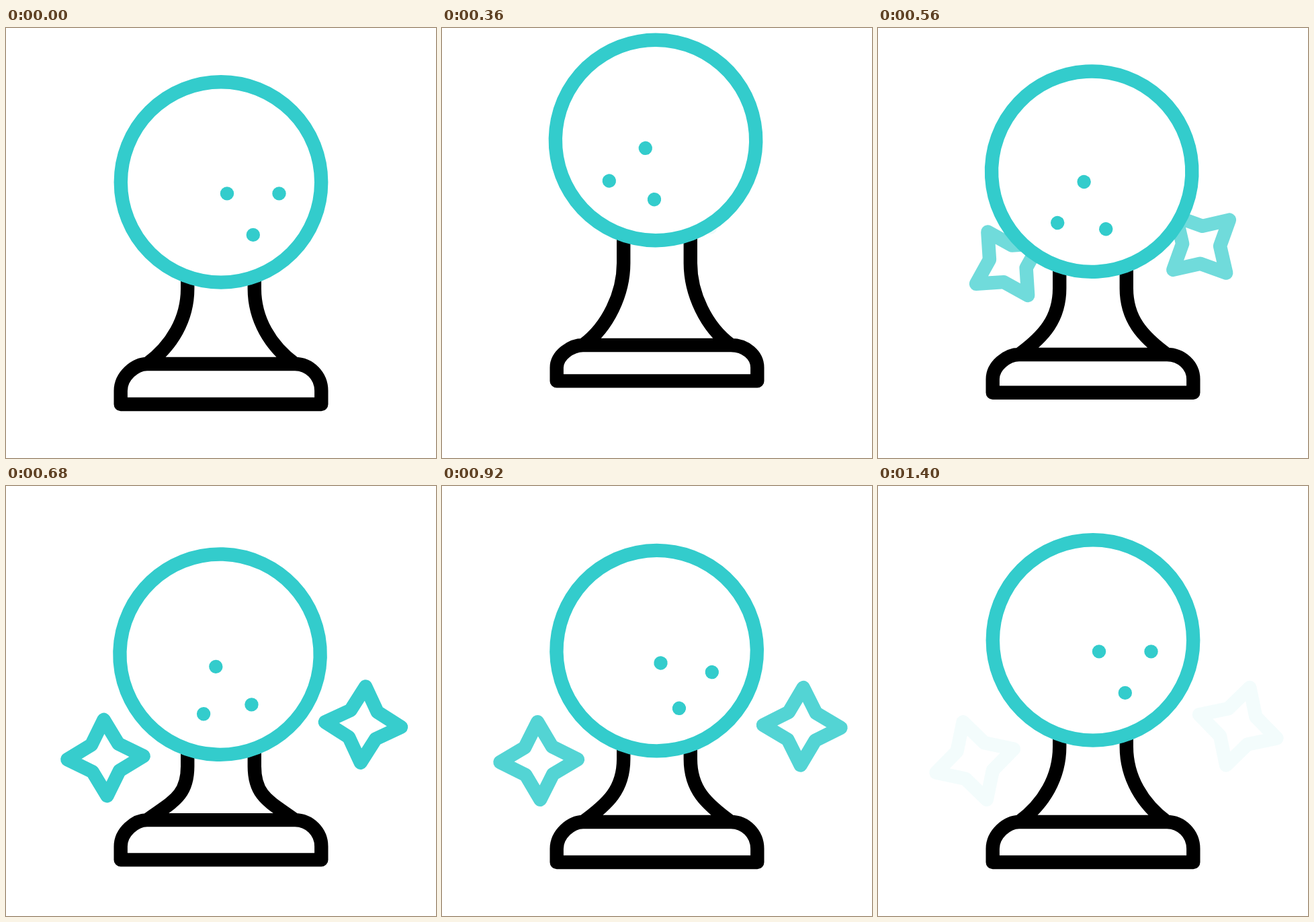
These frames come from a looping animation (640 by 640 pixels, 2 s). An HTML page with a canvas:

```html
<!DOCTYPE html>
<html lang="en">
<head>
<meta charset="utf-8">
<title>Crystal ball</title>
<style>
html, body { margin: 0; height: 100%; overflow: hidden; background: #fff; }
canvas { display: block; width: 100vw; height: 100vh; }
</style>
</head>
<body>
<canvas id="stage" width="640" height="640"></canvas>
<script>
const ctx = document.getElementById('stage').getContext('2d');
const TEAL = '#33cccc', STROKE = 20.4;
const LOOP = 2000, STEP = 40, LAST_MOVE = 1400;

// Eased value between [time, value] keys
function at(t, ...keys) {
  if (t <= keys[0][0]) return keys[0][1];
  for (let i = 1; i < keys.length; i++) {
    const [t0, v0] = keys[i - 1], [t1, v1] = keys[i];
    if (t < t1) {
      const x = (t - t0) / (t1 - t0);
      return v0 + (v1 - v0) * x * x * (3 - 2 * x);
    }
  }
  return keys[keys.length - 1][1];
}

const rad = deg => deg * Math.PI / 180;

function star(t, x0, y0, x1, y1, spinIn, spinOut) {
  const move = (a, b) => at(t, [280, a], [720, b]);
  const angle = rad(at(t, [280, spinIn], [720, 0], [2000, spinOut]));
  const size = at(t, [280, 54], [720, 56.8], [920, 57.8], [1400, 60.4]);
  ctx.save();
  ctx.globalAlpha = at(t, [280, 0], [720, 1], [1520, 0]);
  ctx.translate(move(x0, x1), move(y0, y1));
  ctx.rotate(angle);
  ctx.beginPath();
  for (let i = 0; i < 8; i++) {
    const r = i % 2 ? size * 0.5 : size, a = i * Math.PI / 4;
    ctx.lineTo(r * Math.cos(a), r * Math.sin(a));
  }
  ctx.closePath();
  ctx.strokeStyle = TEAL;
  ctx.stroke();
  ctx.restore();
}

function stand(t, ballY) {
  const top = 500 + at(t, [80, 0], [360, -28], [760, 0]);
  const lift = at(t, [80, 0], [360, -34.6], [760, 0]);
  const knee = 388 + at(t, [80, 0], [360, -38], [760, 37], [1080, 0]);
  const side = 540 + lift, bottom = 560 + lift;
  const k = 0.448;  // quarter-ellipse handle, measured from the corner
  const corner = side - (side - top) * (1 - k);
  ctx.strokeStyle = '#000';
  ctx.beginPath();
  for (const s of [-1, 1]) {
    ctx.moveTo(320 + s * 49.8, ballY + 140);
    ctx.lineTo(320 + s * 49.8, knee);
    ctx.bezierCurveTo(320 + s * 49.8, knee + 45, 320 + s * 73, top - 27, 320 + s * 110, top);
  }
  ctx.moveTo(170.7, bottom);
  ctx.lineTo(170.7, side);
  ctx.bezierCurveTo(170.7, corner, 210 - 39.3 * k, top, 210, top);
  ctx.lineTo(430, top);
  ctx.bezierCurveTo(430 + 39.3 * (1 - k), top, 469.3, corner, 469.3, side);
  ctx.lineTo(469.3, bottom);
  ctx.closePath();
  ctx.stroke();
}

function disc(x, y, r) {
  ctx.beginPath();
  ctx.arc(x, y, r, 0, 2 * Math.PI);
  ctx.fill();
}

function ball(t, y) {
  ctx.save();
  // The pivot sits slightly above the centre
  ctx.translate(320, y - 2);
  ctx.rotate(rad(at(t, [80, 0], [360, 80.2], [1080, 0])));
  ctx.translate(0, 2);
  ctx.fillStyle = '#fff';
  ctx.strokeStyle = TEAL;
  disc(0, 0, 149.2);
  ctx.stroke();
  ctx.fillStyle = TEAL;
  for (const [dx, dy] of [[9, 17], [86.5, 17], [47.8, 78.5]]) disc(dx, dy, 10.2);
  ctx.restore();
}

function draw(t) {
  const ballY = 229.4 + at(t, [80, 0], [360, -60.7], [760, 31.5], [1080, 0]);
  ctx.fillStyle = '#fff';
  ctx.fillRect(0, 0, 640, 640);
  ctx.lineWidth = STROKE;
  ctx.lineJoin = ctx.lineCap = 'round';
  star(t, 307.5, 215.4, 144.2, 409, -107.6, -31);
  star(t, 354, 241.2, 535.7, 357.8, 161, 31);
  stand(t, ballY);
  ball(t, ballY);
}

function tick() {
  const t = performance.now() % LOOP;
  draw(Math.min(LAST_MOVE, Math.floor(t / STEP) * STEP));
  requestAnimationFrame(tick);
}
tick();
</script>
</body>
</html>
```
